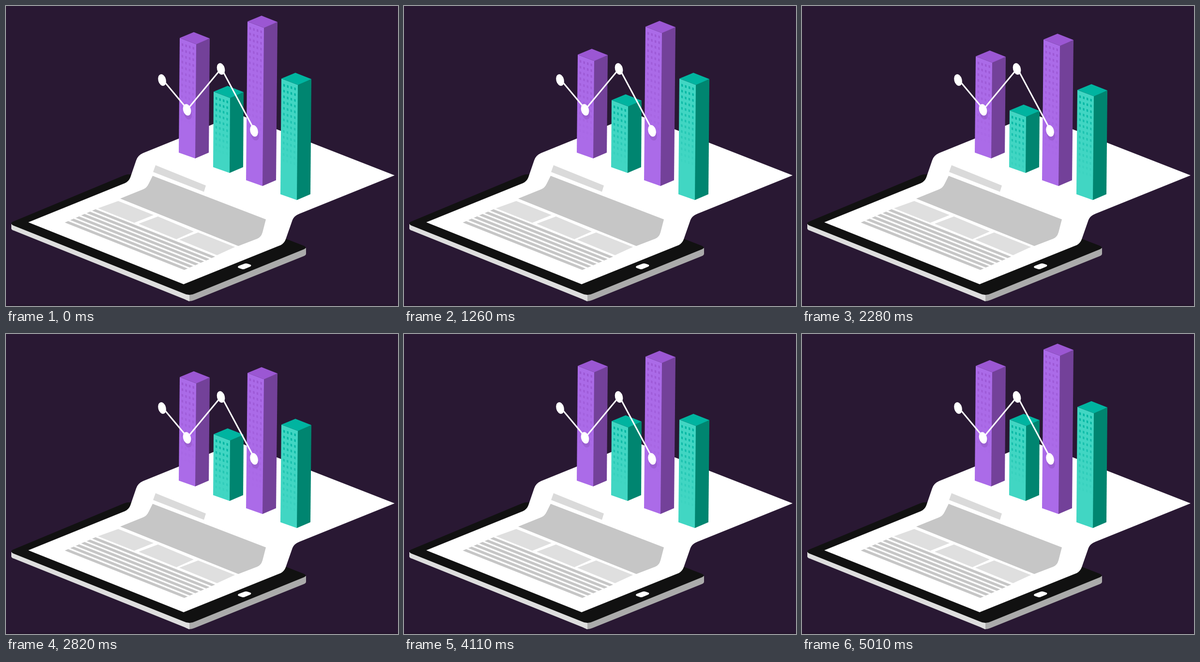
Recreate the animation shown at these times as an HTML page with a canvas. Size 810 by 620 pixels, loop 5.04 s.

```html
<!DOCTYPE html>
<html lang="en">
<head>
<meta charset="utf-8">
<title>Isometric bar chart</title>
<style>
html, body { margin: 0; width: 100%; height: 100%; overflow: hidden; background: #291833; }
canvas { display: block; }
</style>
</head>
<body>
<canvas id="stage" width="810" height="620"></canvas>
<script>
const ctx = document.getElementById('stage').getContext('2d');
const LOOP = 5040;

const PURPLE = { top: '#9b57d3', left: '#ab6be8', right: '#734199' };
const TEAL = { top: '#00b4a0', left: '#41d6c3', right: '#008570' };

// x, y: upper box corner; bx, by: lower left corner; drop: travel in px
const bars = [
  { x: 359, y: 54, bx: 357, by: 303, skin: PURPLE, drop: 50.5, start: 20, low: 1835, end: 3650 },
  { x: 429, y: 165, bx: 428, by: 333, skin: TEAL, drop: 40, start: 420, low: 2340, end: 4260 },
  { x: 499, y: 20, bx: 496, by: 360, skin: PURPLE, drop: 50, start: 850, low: 2765, end: 4680 },
  { x: 569, y: 138, bx: 567, by: 389, skin: TEAL, drop: 50, start: 1365, low: 3320, end: 5040 }
];
const nodes = [[322.5, 153], [374, 214.5], [444, 130], [512.5, 258]];

function fillPath(d, color) {
  ctx.fillStyle = color;
  ctx.fill(new Path2D(d));
}

function poly(color, ...pts) {
  ctx.fillStyle = color;
  ctx.beginPath();
  pts.forEach(([x, y]) => ctx.lineTo(x, y));
  ctx.closePath();
  ctx.fill();
}

function drawTablet() {
  fillPath('M11 450V460Q12 463 16 464L369 606Q379 611 379 610V590Z', '#dedede');
  fillPath('M379 590V610Q384 610 391 607L615 517Q620 515 620 512V500Z', '#ababab');
  fillPath('M11 449Q11 447 16 445L244 350Q252 347 260 348L578 481L614 495Q624 499 615 503L391 594Q379 600 367 594L16 454Q11 452 11 449Z', '#111');
  fillPath('M481 537L493 532.5Q496 531.5 499 532.5L505 534.5Q508 536 505 538.5L493 543.5Q490 544.5 487 543.5L481 541.5Q477 539.5 481 537Z', '#fff');
}

function drawPaper() {
  fillPath('M46 447L246 366Q254 362 257 354L269 319Q272 309 283 304L357 274L478 223L803 350L606 429.5Q595 434 592 442L578 482Q575 490 568 494L367 575Z', '#fff');
  poly('#dadada', [309, 329], [413, 371], [409, 384], [304, 343]);
  fillPath('M303 351L537 441L530 468Q527 478 519 481L480 496L236 398L283 379Q291 376 295 367Z', '#c6c6c6');
  poly('#dfdfdf', [190, 418], [232, 403], [305, 432], [265, 448]);
  poly('#dfdfdf', [274, 450], [314, 435], [388, 466], [352, 482]);
  poly('#dfdfdf', [358, 483], [397, 468], [473, 498], [436, 515]);
  for (let i = 0; i < 6; i++) {
    const x = 185 - i * 11.3, y = 420 + i * 4.9;
    poly('#c6c6c6', [x, y], [x + 247, y + 98], [x + 240, y + 101], [x - 7, y + 3]);
  }
}

function offset(bar, t) {
  if (t <= bar.start || t >= bar.end) return 0;
  return bar.drop * (t < bar.low
    ? (t - bar.start) / (bar.low - bar.start)
    : (bar.end - t) / (bar.end - bar.low));
}

function drawWindows(bar, y) {
  const reach = (bar.by - bar.y) * 0.66;
  const slant = (bar.bx - bar.x) / (bar.by - bar.y);
  ctx.fillStyle = bar.skin.top;
  for (let d = 0; d < reach; d += 11.9) {
    ctx.globalAlpha = 0.95 * (1 - d / reach);
    ctx.beginPath();
    for (let c = 0; c < 4; c++) {
      const dx = 4 + c * 7.5;
      const wx = bar.x + dx + d * slant;
      const wy = y + 21.5 + d + dx * 0.32;
      ctx.moveTo(wx, wy);
      ctx.lineTo(wx + 3.4, wy + 1.2);
      ctx.lineTo(wx + 3.4, wy + 6.4);
      ctx.lineTo(wx, wy + 5.2);
      ctx.closePath();
    }
    ctx.fill();
  }
  ctx.globalAlpha = 1;
}

function drawBar(bar, t) {
  const { x, bx, by, skin } = bar;
  const y = bar.y + offset(bar, t);
  const left = [x, y + 12], front = [x + 34, y + 25], right = [x + 62, y + 13];
  const foot = [bx + 34, by + 12];
  poly(skin.right, [x + 33, y + 24], right, [bx + 62, by], foot, [bx + 33, by + 11]);
  poly(skin.left, left, front, foot, [bx, by]);
  poly(skin.top, left, [x + 29, y], right, front);
  drawWindows(bar, y);
}

function disc(x, y, color) {
  ctx.fillStyle = color;
  ctx.beginPath();
  ctx.ellipse(x, y, 8, 12.2, -0.26, 0, Math.PI * 2);
  ctx.fill();
}

function drawGraph() {
  [nodes[1], nodes[3]].forEach(([x, y]) => disc(x + 2, y + 8, 'rgba(115,65,153,.25)'));
  ctx.strokeStyle = '#fff';
  ctx.lineWidth = 3;
  ctx.lineJoin = 'round';
  ctx.beginPath();
  nodes.forEach(([x, y]) => ctx.lineTo(x + 1, y - 1));
  ctx.stroke();
  nodes.forEach(([x, y]) => disc(x, y, '#fff'));
}

function frame(now) {
  const t = now % LOOP;
  ctx.fillStyle = '#291833';
  ctx.fillRect(0, 0, 810, 620);
  ctx.fillStyle = '#24152d';
  ctx.fillRect(0, 617, 810, 3);
  drawTablet();
  drawPaper();
  bars.forEach(bar => drawBar(bar, t));
  drawGraph();
  requestAnimationFrame(frame);
}
requestAnimationFrame(frame);
</script>
</body>
</html>
```
